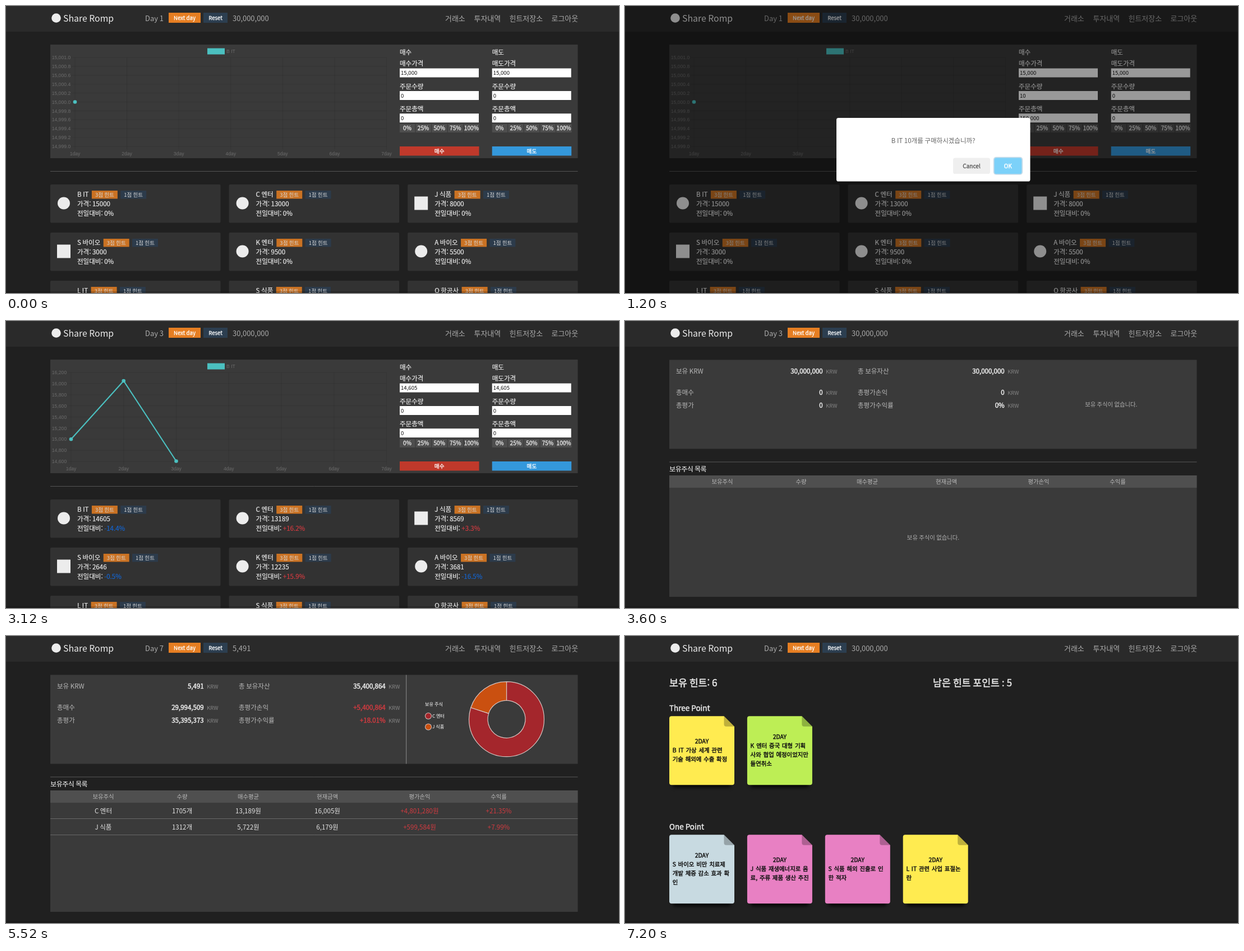
An HTML page with a canvas for the animation above (8400 ms loop, 1093x513 px).

```html
<!DOCTYPE html>
<html lang="ko">
<head>
<meta charset="utf-8">
<title>Share Romp</title>
<style>
html, body { margin: 0; width: 100%; height: 100%; overflow: hidden; background: #202020; }
canvas { display: block; width: 1093px; height: 513px; }
</style>
</head>
<body>
<canvas id="stage"></canvas>
<script>
const W = 1093, H = 513, HOLD = 1200;
const canvas = document.getElementById('stage');
const ctx = canvas.getContext('2d');
const dpr = window.devicePixelRatio || 1;
canvas.width = W * dpr;
canvas.height = H * dpr;

const SANS = '"Noto Sans CJK KR", "Noto Sans CJK", "Noto Sans", sans-serif';
const ARIAL = '"Liberation Sans", Arial, sans-serif';
const LIGHT = '#ececec', GREY = '#ababab', PANEL = '#3a3a3a';
const RED = '#d13b40', BLUE = '#1565d0', TEAL = '#4bc0c0';
const ORANGE = '#e67e22', NAVY = '#2c3e50';

function box(x, y, w, h, fill, r = 0) {
  ctx.fillStyle = fill;
  ctx.beginPath();
  ctx.roundRect(x, y, w, h, r);
  ctx.fill();
}

function disc(x, y, r, fill) {
  ctx.fillStyle = fill;
  ctx.beginPath();
  ctx.arc(x, y, r, 0, Math.PI * 2);
  ctx.fill();
}

function line(x1, y1, x2, y2, color, width = 1) {
  ctx.strokeStyle = color;
  ctx.lineWidth = width;
  ctx.beginPath();
  ctx.moveTo(x1, y1);
  ctx.lineTo(x2, y2);
  ctx.stroke();
}

// cy is the middle of the capitals; heavy adds a thin outline for a medium weight.
function text(s, x, cy, size, color, { align = 'left', heavy = 0, font = SANS, weight = 400 } = {}) {
  ctx.font = `${weight} ${size}px ${font}`;
  ctx.textAlign = align;
  ctx.fillStyle = color;
  const y = cy + size * 0.366;
  ctx.fillText(s, x, y);
  if (heavy) {
    ctx.strokeStyle = color;
    ctx.lineWidth = heavy;
    ctx.lineJoin = 'round';
    ctx.strokeText(s, x, y);
  }
  return ctx.measureText(s).width;
}

const mid = { align: 'center' };
const midHeavy = { align: 'center', heavy: 0.3 };

function header(day, money) {
  box(0, 0, W, H, '#202020');
  box(0, 0, W, 46, '#2a2a2a');
  disc(89.5, 21.5, 8.3, LIGHT);
  text('Share Romp', 102, 22, 15.84, LIGHT);
  text('Day ' + day, 248, 22, 12.96, GREY);
  box(290, 12, 57, 18, ORANGE);
  text('Next day', 318.5, 21.5, 9.6, '#fff', midHeavy);
  box(352, 12, 43, 18, NAVY);
  text('Reset', 373.5, 21.5, 9.6, '#fff', midHeavy);
  text(money, 404, 22, 12.96, GREY);
  [['거래소', 783], ['투자내역', 834.5], ['힌트저장소', 897.5], ['로그아웃', 972.5]]
    .forEach(([s, x]) => text(s, x, 22, 12.96, GREY));
}

// Price chart

function chart(left, labels, prices, low, high) {
  const right = 678.5, top = 92, bottom = 251;
  const dim = '#6b6b6b', grid = 'rgba(0,0,0,.1)';
  box(359, 75.5, 31, 11, TEAL);
  text('B IT', 393, 80.5, 8.64, dim, { font: ARIAL });
  labels.forEach((s, i) => {
    const y = top + (bottom - top) * i / (labels.length - 1);
    line(left - 5.8, y, right, y, grid);
    text(s, left - 7.8, y, 8.64, dim, { font: ARIAL, align: 'right' });
  });
  const dayX = i => left + (right - left) * i / 6;
  for (let i = 0; i < 7; i++) {
    line(dayX(i), top, dayX(i), bottom + 5.8, grid);
    text(`${i + 1}day`, dayX(i), 264, 8.64, dim, { font: ARIAL, align: 'center' });
  }
  const priceY = p => bottom - (bottom - top) * (p - low) / (high - low);
  ctx.beginPath();
  prices.forEach((p, i) => ctx.lineTo(dayX(i), priceY(p)));
  ctx.strokeStyle = TEAL;
  ctx.lineWidth = 2.16;
  ctx.lineJoin = 'miter';
  ctx.stroke();
  prices.forEach((p, i) => disc(dayX(i), priceY(p), 3.3, TEAL));
}

function orderForm(x, kind, color, values) {
  const opt = { heavy: 0.2 };
  text(kind, x, 83, 11.52, LIGHT, opt);
  [kind + '가격', '주문수량', '주문총액'].forEach((s, i) => {
    const y = 103 + i * 40.4;
    text(s, x, y, 11.52, LIGHT, opt);
    box(x, y + 8.5, 141, 16, '#fff');
    text(values[i], x + 2, y + 16.8, 9.6, '#111');
  });
  for (let i = 0; i < 5; i++) {
    box(x + i * 28.6, 211, 27.4, 15, '#4e4e4e');
    text(i * 25 + '%', x + 13.5 + i * 28.6, 218.5, 10.08, LIGHT, midHeavy);
  }
  box(x, 251, 141.5, 16.5, color);
  text(kind, x + 70.7, 259.3, 9.6, '#fff', midHeavy);
}

function badge(s, x, cy, fill) {
  ctx.globalAlpha = 0.85;
  box(x, cy - 7, 46, 14.5, fill);
  ctx.globalAlpha = 1;
  text(s, x + 23, cy + 0.3, 9.6, '#d8d8d8', mid);
}

const COMPANIES = ['B IT', 'C 엔터', 'J 식품', 'S 바이오', 'K 엔터', 'A 바이오', 'L IT', 'S 식품', 'O 항공사'];
const SQUARES = [2, 3];

function card(i, price, change) {
  const x = 79 + (i % 3) * 318.6, y = 319 + Math.floor(i / 3) * 86;
  const opt = { heavy: 0.2 };
  box(x, y, 303.5, 68.5, '#323232', 2);
  const w = text(COMPANIES[i], x + 48, y + 18, 11.52, LIGHT, opt);
  badge('3점 힌트', x + 48 + w + 5.5, y + 18, ORANGE);
  badge('1점 힌트', x + 48 + w + 56.8, y + 18, NAVY);
  if (price === undefined) return;
  if (SQUARES.includes(i)) box(x + 12, y + 21.5, 24, 24, LIGHT);
  else disc(x + 24, y + 33.5, 11, LIGHT);
  text('가격: ' + price, x + 48, y + 34.7, 11.52, LIGHT, opt);
  const cw = text('전일대비: ', x + 48, y + 51.5, 11.52, LIGHT, opt);
  const color = change[0] === '+' ? RED : change[0] === '-' ? BLUE : LIGHT;
  text(change, x + 48 + cw, y + 51.5, 11.52, color, opt);
}

function market({ day, chartArgs, order, sell, prices, changes }) {
  header(day, '30,000,000');
  box(79, 69, 940.5, 203, PANEL);
  chart(...chartArgs);
  orderForm(702, '매수', '#c0392b', order);
  orderForm(866.7, '매도', '#3498db', sell);
  line(79, 295.5, 1019.5, 295.5, '#555');
  COMPANIES.forEach((_, i) => card(i, prices[i], changes[i]));
}

const range = (n, from, step, digits) => Array.from({ length: n }, (_, i) =>
  (from - i * step).toLocaleString('en-US', { minimumFractionDigits: digits, maximumFractionDigits: digits }));

function openingDay(order) {
  market({
    day: 1, order, sell: ['15,000', '0', '0'],
    chartArgs: [123, range(11, 15001, 0.2, 1), [15000], 14999, 15001],
    prices: [15000, 13000, 8000, 3000, 9500, 5500],
    changes: Array(6).fill('0%')
  });
}

function thirdDay() {
  const order = ['14,605', '0', '0'];
  market({
    day: 3, order, sell: order,
    chartArgs: [116, range(9, 16200, 200, 0), [15000, 16049, 14605], 14600, 16200],
    prices: [14605, 13189, 8569, 2646, 12235, 3681],
    changes: ['-14.4%', '+16.2%', '+3.3%', '-0.5%', '+15.9%', '-16.5%']
  });
}

function dialog() {
  box(0, 0, W, H, 'rgba(0,0,0,.4)');
  box(377, 200, 345.5, 113.5, '#fff', 3.6);
  text('B IT 10개를 구매하시겠습니까?', 549.7, 241, 11.52, '#666', mid);
  box(585, 271.5, 66, 28.5, '#efefef', 3.6);
  text('Cancel', 618, 286.5, 10.08, '#555', midHeavy);
  box(656.8, 269.8, 52.4, 32, '#c4dbea', 5);
  box(658.6, 271.5, 48.6, 28.5, '#7cd1f9', 3.6);
  text('OK', 682.8, 286.5, 10.08, '#fff', { align: 'center', heavy: 0.5 });
}

// Portfolio

const EMPTY = '보유 주식이 없습니다.';
const COLUMNS = [173.5, 314, 432, 573, 737.5, 878.5];

function portfolio(day, money, values) {
  header(day, money);
  box(79, 69.5, 940.5, 159, PANEL);
  ['보유 KRW', '총 보유자산', '총매수', '총평가손익', '총평가', '총평가수익률'].forEach((s, i) => {
    const x = 91 + (i % 2) * 324, y = [90, 128, 150.3][i >> 1];
    const v = values[i];
    text(s, x, y, 11.52, '#b8b8b8');
    text(v, x + 261.7, y, 11.52, v[0] === '+' ? RED : '#f2f2f2', { align: 'right', heavy: 0.45 });
    text('KRW', x + 267.3, y + 0.8, 9.36, '#868686');
  });
  line(79, 252, 1019.5, 252, '#585858');
  text('보유주식 목록', 79.3, 265, 11.52, LIGHT, { heavy: 0.2 });
  box(79, 276, 940.5, 217, PANEL);
  box(79, 276, 940.5, 22, '#4f4f4f');
  ['보유주식', '수량', '매수평균', '현재금액', '평가손익', '수익률']
    .forEach((s, i) => text(s, COLUMNS[i], 287.5, 10.37, '#b8b8b8', mid));
}

function emptyPortfolio() {
  portfolio(3, '30,000,000', ['30,000,000', '30,000,000', '0', '0', '0', '0%']);
  text(EMPTY, 866.8, 149.3, 10.37, '#b0b0b0', mid);
  text(EMPTY, 549.5, 387, 10.37, '#b0b0b0', mid);
}

function slice(from, to, fill) {
  const turn = t => (t - 0.25) * Math.PI * 2;
  ctx.beginPath();
  ctx.arc(892.5, 148.7, 67, turn(from), turn(to));
  ctx.arc(892.5, 148.7, 33.5, turn(to), turn(from), true);
  ctx.closePath();
  ctx.fillStyle = fill;
  ctx.fill();
  ctx.strokeStyle = '#d8c4c0';
  ctx.lineWidth = 1.2;
  ctx.stroke();
}

function fullPortfolio() {
  portfolio(7, '5,491', ['5,491', '35,400,864', '29,994,509', '+5,400,864', '35,395,373', '+18.01%']);
  line(713.7, 69.5, 713.7, 228.5, '#8c8c8c');
  text('보유 주식', 747, 121.5, 8.2, '#fff');
  [['C 엔터', '#a4262c', 143], ['J 식품', '#ca5010', 162.5]].forEach(([s, color, y]) => {
    disc(753, y, 6, '#d8c4c0');
    disc(753, y, 5, color);
    text(s, 760, y - 0.3, 8.2, '#fff');
  });
  slice(0, 0.8, '#a4262c');
  slice(0.8, 1, '#ca5010');
  [
    ['C 엔터', '1705개', '13,189원', '16,005원', '+4,801,280원', '+21.35%'],
    ['J 식품', '1312개', '5,722원', '6,179원', '+599,584원', '+7.99%']
  ].forEach((row, r) => {
    const y = 313 + r * 29;
    row.forEach((s, i) => text(s, COLUMNS[i], y, 11.52, s[0] === '+' ? RED : '#e4e4e4', mid));
    line(79, y + 13.5, 1019.5, y + 13.5, '#686868');
  });
}

// Hint notes

const YELLOW = '#ffeb50', GREEN = '#bdee55', SKY = '#c8dae1', PINK = '#e880c3';

function note(col, row, fill, lines) {
  const x = 79 + col * 138.9, y = 143.3 + row * 212, w = 116, h = 123, fold = 18.5, r = 4;
  ctx.save();
  ctx.shadowColor = 'rgba(0,0,0,.9)';
  ctx.shadowBlur = 6 * dpr;
  ctx.shadowOffsetY = 4 * dpr;
  box(x + 6, y + h - 20, w - 12, 20, '#000', r);
  ctx.restore();

  ctx.fillStyle = fill;
  ctx.beginPath();
  ctx.moveTo(x + w - fold, y);
  ctx.lineTo(x + w, y + fold);
  ctx.arcTo(x + w, y + h, x, y + h, r);
  ctx.arcTo(x, y + h, x, y, r);
  ctx.arcTo(x, y, x + w, y, r);
  ctx.closePath();
  ctx.fill();

  ctx.fillStyle = 'rgba(0,0,0,.25)';
  ctx.beginPath();
  ctx.moveTo(x + w - fold, y);
  ctx.lineTo(x + w, y + fold);
  ctx.arcTo(x + w - fold, y + fold, x + w - fold, y, r);
  ctx.closePath();
  ctx.fill();

  ctx.wordSpacing = '1.5px';
  lines.forEach((s, i) => {
    const cy = y + 61 + (i - (lines.length - 1) / 2) * 15.8;
    const title = s === '2DAY';
    text(s, title ? x + w / 2 : x + 5.7, cy, 10.4, '#111', { align: title ? 'center' : 'left', heavy: 0.45 });
  });
  ctx.wordSpacing = '0px';
}

function hints(day, owned, points, notes) {
  header(day, '30,000,000');
  text('보유 힌트: ' + owned, 79, 83.5, 17.28, LIGHT, { heavy: 0.45 });
  text('남은 힌트 포인트 : ' + points, 549, 83.5, 17.28, LIGHT, { heavy: 0.45 });
  text('Three Point', 79, 129, 13.48, LIGHT, { heavy: 0.45 });
  text('One Point', 79, 340.7, 13.48, LIGHT, { heavy: 0.45 });
  notes.forEach(n => note(...n));
}

const NONE = ['보유한 힌트가 없습니', '다.'];
const dayTwo = (...lines) => ['2DAY', ...lines];

const scenes = [
  () => openingDay(['15,000', '0', '0']),
  () => { openingDay(['15,000', '10', '150,000']); dialog(); },
  thirdDay,
  emptyPortfolio,
  fullPortfolio,
  () => hints(1, 0, 15, [[0, 0, YELLOW, NONE], [0, 1, YELLOW, NONE]]),
  () => hints(2, 6, 5, [
    [0, 0, YELLOW, dayTwo('B IT 가상 세계 관련', '기술 해외에 수출 확정')],
    [1, 0, GREEN, dayTwo('K 엔터 중국 대형 기획', '사와 협업 예정이었지만', '돌연취소')],
    [0, 1, SKY, dayTwo('S 바이오 비만 치료제', '개발 체중 감소 효과 확', '인')],
    [1, 1, PINK, dayTwo('J 식품 재생에너지로 음', '료, 주류 제품 생산 추진')],
    [2, 1, PINK, dayTwo('S 식품 해외 진출로 인', '한 적자')],
    [3, 1, YELLOW, dayTwo('L IT 관련 사업 표절논', '란')]
  ])
];

const start = performance.now();

function frame() {
  const t = Math.max(0, performance.now() - start);
  ctx.setTransform(dpr, 0, 0, dpr, 0, 0);
  scenes[Math.floor(t / HOLD) % scenes.length]();
  box(0, 510, W, 3, 'rgba(0,0,0,.2)');
  requestAnimationFrame(frame);
}
frame();
</script>
</body>
</html>
```
